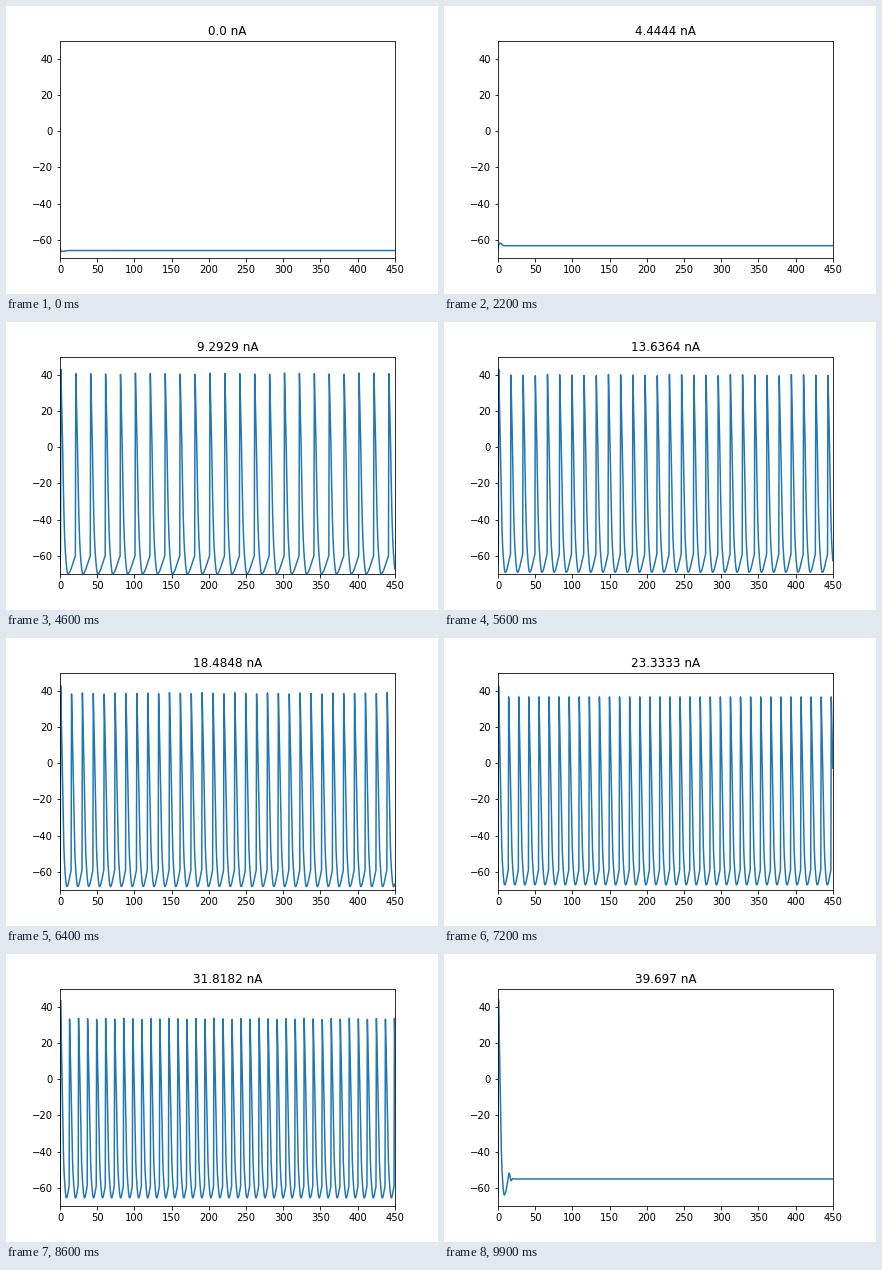
Recreate the animation shown at these times as a matplotlib script. Size 432 px wide and 288 px high, loop 10 s.

```python
import math

import numpy as np
import matplotlib.pyplot as plt
from matplotlib.animation import FuncAnimation

FRAMES, INTERVAL = 100, 100
DT = 0.05
T = np.arange(0, 450 + DT / 2, DT)

# Injected current: fine steps up to 10 nA, coarser ones up to 40 nA
CURRENT = np.r_[np.arange(50) * 20 / 99, 10 + np.arange(50) * 60 / 99]

SPIKE_MIN, TRAIN_MIN, BLOCK_MIN = 6.0, 8.0, 35.0
RISE = 0.5

# Firing period, smooth in log-log space
PERIOD_FIT = np.polyfit(np.log([9.293, 13.636, 23.333, 28.182]),
                        np.log([20.04, 16.39, 13.55, 12.70]), 3)

# Repolarisation from peak (1) to trough (0)
FALL_X = [0, .12, .24, .4, .56, .68, .8, .9, 1]
FALL_Y = [1, .83, .64, .34, .155, .085, .035, .008, 0]


def curve(x, px, py):
    """Cubic Hermite curve through a few points."""
    px, py = np.asarray(px, float), np.asarray(py, float)
    slope = np.gradient(py, px)
    slope[-1] = 0
    x = np.clip(x, px[0], px[-1])
    i = np.clip(np.searchsorted(px, x, side="right") - 1, 0, len(px) - 2)
    h = px[i + 1] - px[i]
    u = (x - px[i]) / h
    return ((1 + 2 * u) * (1 - u) ** 2 * py[i] + u * (1 - u) ** 2 * h * slope[i]
            + u * u * (3 - 2 * u) * py[i + 1] + u * u * (u - 1) * h * slope[i + 1])


def membrane(current, v=-65.0, n=0.3177, span=80):
    """Potassium and leak response below the firing threshold."""
    out = []
    for _ in range(int(span / DT)):
        out.append(v)
        x = (v + 55) / 10
        a = 0.1 if abs(x) < 1e-6 else -0.1 * x / math.expm1(-x)
        b = 0.125 * math.exp(-(v + 65) / 80)
        dv = current - 36 * n ** 4 * (v + 77) - 0.3 * (v + 54.4)
        v += DT * dv
        n += DT * (a * (1 - n) - b * n)
    return np.array(out)


def held(samples, t):
    return np.interp(t, np.arange(len(samples)) * DT, samples)


def voltage(current):
    if current < SPIKE_MIN:
        return held(membrane(current), T)

    first = 0.5 + 6 / current
    first_peak = 43 + (current - 9) / 30
    peak = 41.6 - 0.0078 * current ** 2
    trough = -71.7 + 0.195 * current
    fall = 7.4 + 20 / current
    s = T - first

    if TRAIN_MIN <= current < BLOCK_MIN:
        period = math.exp(np.polyval(PERIOD_FIT, math.log(current)))
        shoulder = -59 - max(0, 13 - current) / 4
        k = np.floor(s / period)
        s = np.where(s < 0, s, s - k * period)
        top = np.where(k < 1, first_peak, peak)
        ready = period - RISE
        u = np.clip((s - fall) / (ready - fall), 0, 1)
        tail = trough + (shoulder - trough) * (2 * u ** 2 - u ** 3)
        upstroke = shoulder + (peak - shoulder) * (s - ready) / RISE
        tail = np.where(s > ready, upstroke, tail)
    else:
        top = first_peak
        if current < TRAIN_MIN:
            n = ((current - 0.3 * (trough + 54.4)) / (36 * (trough + 77))) ** 0.25
            tail = held(membrane(current, trough, n), s - fall)
        else:
            rest = membrane(current)[-1]
            tail = curve(s - fall, [0, 1.5, 4.5, 6.4, 8.6, 11, 14, 18],
                         [trough, trough + 1.2, rest - 1.2, rest + 3.2,
                          rest - 0.8, rest + 0.1, rest, rest])

    down = trough + (top - trough) * curve(s / fall, FALL_X, FALL_Y)
    start = np.interp(T, [0, first - RISE, first], [-65, -58, first_peak])
    return np.where(s < 0, start, np.where(s < fall, down, tail))


fig, ax = plt.subplots(figsize=(6, 4), dpi=72)
fig.subplots_adjust(left=0.125, right=0.9, bottom=0.125, top=0.88)
ax.set_xlim(0, 450)
ax.set_ylim(-70, 50)
line, = ax.plot([], [], color="C0", lw=1.5)
title = ax.set_title("")


def update(frame):
    current = float(CURRENT[frame])
    line.set_data(T, voltage(current))
    title.set_text(f"{round(current, 4)} nA")
    return line, title


anim = FuncAnimation(fig, update, frames=FRAMES, interval=INTERVAL,
                     repeat=True, repeat_delay=0)
plt.show()
```
